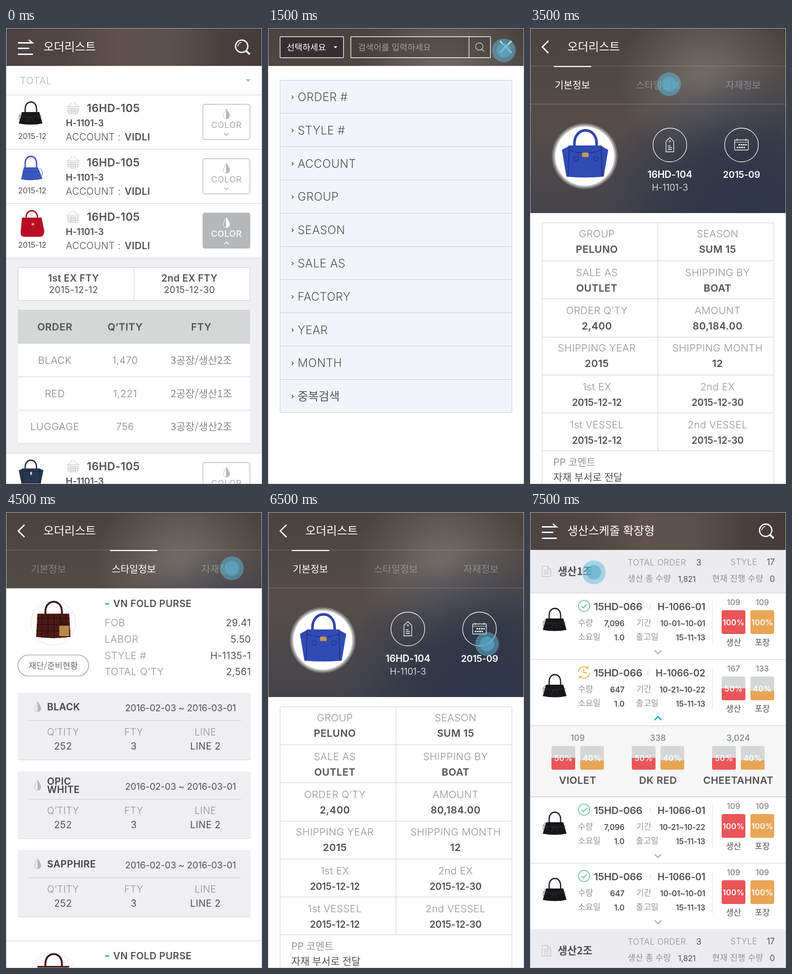
An HTML page that plays this animation: 561x998 px, repeating every 8 s.

```html
<!DOCTYPE html>
<html lang="ko">
<head>
<meta charset="utf-8">
<title>Order list</title>
<style>
html, body { margin: 0; width: 100%; height: 100%; overflow: hidden; background: #fff; }
svg { display: block; width: 100%; height: 100%; }
text { font-family: Inter, "Noto Sans CJK KR", "Noto Sans KR", sans-serif; font-optical-sizing: none; letter-spacing: .02em; white-space: pre; }
.k { font-family: "Noto Sans CJK KR", "Noto Sans KR", "Noto Sans CJK", sans-serif; letter-spacing: 0; }
.n { letter-spacing: -.01em; }
.l { font-weight: 300; }
.d { font-weight: 350; }
.m { font-weight: 500; }
.b { font-weight: 600; }
.c { text-anchor: middle; }
.e { text-anchor: end; }

.page { opacity: 0; animation: 8s step-end infinite; }
#list { animation-name: list; }
#search { animation-name: search; }
#basic { animation-name: basic; }
#style { animation-name: style; }
#parts { animation-name: parts; }
#plan { animation-name: plan; }
@keyframes list { 0%, 25% { opacity: 1 } 12.5%, 37.5%, 100% { opacity: 0 } }
@keyframes search { 0%, 25%, 100% { opacity: 0 } 12.5% { opacity: 1 } }
@keyframes basic { 0%, 50%, 87.5%, 100% { opacity: 0 } 37.5%, 75% { opacity: 1 } }
@keyframes style { 0%, 62.5%, 100% { opacity: 0 } 50% { opacity: 1 } }
@keyframes parts { 0%, 75%, 100% { opacity: 0 } 62.5% { opacity: 1 } }
@keyframes plan { 0%, 100% { opacity: 0 } 87.5% { opacity: 1 } }

#touch { animation: hop 8s step-end infinite; }
#touch g { animation: tap 1s step-end infinite; }
@keyframes tap { 0%, 100% { opacity: 0 } 50% { opacity: 1 } }
@keyframes hop {
  0% { transform: translate(517px, 49px) }
  25% { transform: translate(228px, 194px) }
  37.5% { transform: translate(305px, 123px) }
  50% { transform: translate(495px, 123px) }
  62.5% { transform: translate(86px, 137px) }
  75% { transform: translate(480px, 289px) }
  87.5%, 100% { transform: translate(140px, 132px) }
}
</style>
</head>
<body>
<svg id="stage" viewBox="0 0 561 998">
  <defs>
    <linearGradient id="bar">
      <stop offset="0" stop-color="#4b4443"/><stop offset=".22" stop-color="#504543"/>
      <stop offset=".45" stop-color="#60524c"/><stop offset=".65" stop-color="#5a514d"/>
      <stop offset=".85" stop-color="#47403e"/><stop offset="1" stop-color="#433c3a"/>
    </linearGradient>
    <linearGradient id="base" gradientUnits="userSpaceOnUse" x1="0" y1="0" x2="0" y2="405">
      <stop offset="0" stop-color="#494340"/><stop offset=".5" stop-color="#544d4a"/>
      <stop offset="1" stop-color="#45444a"/>
    </linearGradient>
    <radialGradient id="glow" gradientUnits="userSpaceOnUse" cx="385" cy="115" r="190">
      <stop offset="0" stop-color="#746e6a"/><stop offset="1" stop-color="#746e6a" stop-opacity="0"/>
    </radialGradient>
    <radialGradient id="navy" gradientUnits="userSpaceOnUse" cx="480" cy="410" r="330">
      <stop offset="0" stop-color="#2d3549"/><stop offset=".45" stop-color="#303748" stop-opacity=".9"/>
      <stop offset="1" stop-color="#303748" stop-opacity="0"/>
    </radialGradient>
  </defs>
</svg>
<script>
const INK = '#515153', GREY = '#939395', PALE = '#b6b7b9', RULE = '#cbcbcd', TEAL = '#1db3c0';
const RED = '#ea5559', AMBER = '#e8a556';

const t = (x, y, size, cls, fill, s) =>
  `<text x="${x}" y="${y}" font-size="${size}" class="${cls}" fill="${fill}">${s}</text>`;
const rect = (x, y, w, h, fill, more = '') =>
  `<rect x="${x}" y="${y}" width="${w}" height="${h}" fill="${fill}" ${more}/>`;
const path = (d, stroke, w = 1, fill = 'none') =>
  `<path d="${d}" stroke="${stroke}" stroke-width="${w}" fill="${fill}"/>`;
const ring = (x, y, r, stroke, w, fill = 'none') =>
  `<circle cx="${x}" cy="${y}" r="${r}" stroke="${stroke}" stroke-width="${w}" fill="${fill}"/>`;
const hline = (y, x1 = 0, x2 = 561, c = RULE) => path(`M${x1} ${y + .5}H${x2}`, c);
const at = (x, y, s, k = 1) => `<g transform="translate(${x} ${y}) scale(${k})">${s}</g>`;
const box = (c, r = 0) => `stroke="${c}" rx="${r}"`;
const rows = (list, f) => list.map(f).join('');
const chevron = (x, y, w, up, c, sw) =>
  path(`M${x - w} ${y + (up ? w : -w) / 2}L${x} ${y - (up ? w : -w) / 2}L${x + w} ${y + (up ? w : -w) / 2}`, c, sw);

// Bags are drawn in a 52 by 52 box
const BAGS = {
  black: ['#17171a', '#3a3a3e', 'M7 23H45L52 48Q26 53 0 48Z', 'M2 31Q26 36 50 31M24 33L18 44M27 33L32 43M6 24Q-2 32 2 40'],
  blue: ['#3a57c0', '#2a409a', 'M11 25H42L52 50Q28 56 5 51Z', 'M8 33Q27 37 46 33M45 27Q56 33 50 44'],
  red: ['#b90d27', '#7f0a1c', 'M7 16H50L56 46Q55 58 47 58H12Q4 58 4 48Z', 'M8 19H49M16 16V24M40 16V24'],
  navy: ['#29364f', '#131b2b', 'M0 23L9 19H45L54 23L48 53H6Z', 'M9 19L8 53M45 19L46 53M9 25H45'],
  wing: ['#314bb4', '#1f3182', 'M0 23L9 18H43L52 23L47 53Q26 55 5 53Z', 'M8 18L7 53M44 18L45 53M8 23Q26 30 44 23'],
  maroon: ['#4b1a18', '#2a0d0c', 'M2 19H50L52 54Q26 58 0 54Z', 'M1 26H51M1 35H51M0 45H52M9 20V55M18 20V55M27 20V56M36 20V56M45 20V55']
};
const TRIM = {
  red: rect(28, 28, 6, 5, '#e2b04a', 'rx="2"'),
  navy: rect(25, 26, 4, 7, '#c9c9cd', 'rx="1"'),
  wing: rect(22.5, 26, 7.5, 5, '#c29a55', 'rx="1"') + ring(16, 33, 2.5, '#1f3182', .8) + ring(38, 33, 2.5, '#1f3182', .8),
  maroon: path('M34 20L42 38', '#2a0d0c', 1) + rect(35, 37, 15, 16, '#b98a4c', 'rx="1"')
};
function bag(kind, x, y, k = 1) {
  const [main, dark, body, seams] = BAGS[kind];
  const wide = kind === 'red' ? 2 : 0;
  const grip = `M${14 + wide} 28V16C${14 + wide} -4 ${39 + wide} -4 ${39 + wide} 16V28`;
  return at(x, y, path(grip, dark, 2.8) + path(body, 'none', 0, main) + path(seams, dark, .9) +
    path(grip, main, 1.6) + (TRIM[kind] || ''), k);
}

const drop = (x, y, c) => at(x, y,
  path('M0 -11Q-7 0 -7 4.5A7 6.8 0 0 0 0 11Z', c, 1) + path('M0 -11Q7 0 7 4.5A7 6.8 0 0 1 0 11Z', c, 1, c));
const basket = (x, y) => at(x, y, path('M.5 10.5H30M3 14H28L25 26H6ZM5 10L14 .5M26 10L17 .5M4 18H27M5 22H26M11 14V26M15.500 14V26M20 14V26', PALE));
const title = s => t(82, 50, 25, 'k d', '#fff', s);
const lens = path('M526.500 50.500L534 57.500', '#fff', 4) + ring(516.5, 40, 13.5, '#fff', 2.8) +
  path('M508 40A8.500 8.500 0 0 1 516 31.500', '#fff', 1.5);
const topBar = s => rect(0, 1, 561, 82, 'url(#bar)') +
  path('M26 32.500H58L50 26M26 44.500H51M26 57.500H59', '#fff', 2.8) + title(s) + lens;
const hero = h => rows(['base', 'glow', 'navy'], g => rect(0, 1, 561, h - 1, `url(#${g})`));

function item(top, kind, open) {
  const c = open ? '#fff' : PALE;
  return bag(kind, 28, top + 15) +
    t(57.5, top + 97, 17, 'c n', INK, '2015-12') + basket(131.5, top + 15.5) +
    t(177, top + 38, 24, 'b', INK, '16HD-105') + t(131, top + 69, 20, 'b n', INK, 'H-1101-3') +
    t(131, top + 100, 21, 'l', INK, 'ACCOUNT :') + t(260, top + 100, 21, 'b', INK, 'VIDLI') +
    rect(431.5, top + 21, 103, 77, open ? PALE : '#fff', box(PALE, 4) + ' stroke-width="1.4"') +
    drop(483, top + 42, c) + t(483, top + 73, 19, 'c m', c, 'COLOR') +
    chevron(483, top + 86.5, 4.5, open, c, 1.8) + hline(top + 119);
}

function listPage() {
  const orders = [['BLACK', '1,470', '3공장/생산2조'], ['RED', '1,221', '2공장/생산1조'], ['LUGGAGE', '756', '3공장/생산2조']];
  const mid = [107, 261, 428];
  return topBar('오더리스트') + t(30, 123, 22, 'l', PALE, 'TOTAL') +
    path('M525 112H536L530.500 118Z', 'none', 0, PALE) + hline(146) +
    rect(0, 503, 561, 427, '#efeff1') +
    item(146, 'black') + item(265, 'blue') + item(384, 'red', true) + hline(930) + item(930, 'navy') +
    rect(26.5, 524.5, 508, 72, '#fff', box(RULE)) + path('M280.500 525V597', RULE) +
    rows([[148, '1st', '12'], [402, '2nd', '30']], ([x, n, d]) =>
      t(x, 555, 21, 'c b', INK, n + ' EX FTY') + t(x, 580, 20, 'c', INK, '2015-12-' + d)) +
    rect(26, 618, 509, 73, '#d5d7d6') + rect(26, 691, 509, 218, '#fff') + hline(617, 26, 535) +
    rows(['ORDER', 'Q’TITY', 'FTY'], (s, i) => t(mid[i], 662, 22, 'c b', INK, s)) +
    rows(orders, (o, r) => hline(690 + 73 * (r + 1), 26, 535) +
      rows(o, (s, i) => t(mid[i], 735 + 72.7 * r, 22, i > 1 ? 'c k d' : 'c l', '#868688', s)));
}

function searchPage() {
  const keys = ['ORDER #', 'STYLE #', 'ACCOUNT', 'GROUP', 'SEASON', 'SALE AS', 'FACTORY', 'YEAR', 'MONTH', '중복검색'];
  return hero(83) +
    rect(26.5, 19, 139, 46, '#343031', box('#fff', 1) + ' stroke-width="1.4"') +
    t(41, 48.5, 18.7, 'k l', '#fff', '선택하세요') + path('M144 40H152L148 44.500Z', 'none', 0, '#fff') +
    rect(181.5, 19, 306, 46, '#3a3433', box('#fff', 1) + ' fill-opacity=".35" stroke-width="1.4"') +
    path('M440.500 19V65', '#fff', 1.3) + t(197, 48.5, 18.7, 'k l', '#a49e9b', '검색어를 입력하세요') +
    ring(463, 40.5, 8, '#e4e2e1', 1.3) + path('M468.500 46.500L474 51.500', '#e4e2e1', 1.4) +
    path('M508.500 28.500L533.500 54M533.500 28.500L508.500 54', '#fff', 3.4) +
    rect(26.5, 114.5, 508, 727, '#f1f5fa', box('#c6cad0', 2)) +
    rows(keys, (s, i) => {
      const y = 151 + 72.8 * i;
      return (i ? hline(Math.round(y - 37.5), 27, 534, '#c6cad0') : '') +
        path(`M52 ${y - 3}L55.500 ${y + .5}L52 ${y + 4}`, INK, 1.7) +
        t(65, y + 9, 25, s < 'Z' ? 'l' : 'k', INK, s);
    });
}

function tabs(h, on) {
  const names = ['기본정보', '스타일정보', '자재정보'], mid = [93, 280, 467], half = [41, 52, 41];
  return hero(h) + path('M40.500 28L27 41.500L40.500 55', '#fff', 3) + title('오더리스트') +
    hline(83, 0, 561, '#ffffff40') + (h > 167 ? hline(166, 0, 561, '#ffffff40') : '') +
    rect(mid[on] - half[on], 83, 2 * half[on], 2.4, '#fff') +
    rows(names, (s, i) => t(mid[i], 132, 21, i === on ? 'c k m' : 'c k d', i === on ? '#fff' : '#ffffff50', s));
}

function basicPage() {
  const pairs = [['GROUP', 'PELUNO', 'SEASON', 'SUM 15'], ['SALE AS', 'OUTLET', 'SHIPPING BY', 'BOAT'],
    ['ORDER Q’TY', '2,400', 'AMOUNT', '80,184.00'], ['SHIPPING YEAR', '2015', 'SHIPPING MONTH', '12'],
    ['1st EX', '2015-12-12', '2nd EX', '2015-12-30'], ['1st VESSEL', '2015-12-12', '2nd VESSEL', '2015-12-30']];
  const base = [458, 543, 626, 708, 793, 876];
  const tag = path('M298 271V248L306.500 240L315 248V271ZM302 258H308M302 262H311M302 266H311', '#fff', 1.3) + ring(306.5, 248, 1.8, '#fff', 1);
  const cal = rect(448.5, 245, 30, 22, 'none', box('#fff', 1) + ' stroke-width="1.3"') +
    path('M449 250H478M454 242V247M473 242V247', '#fff', 1.2) +
    path('M457 255.500H475M453 261.500H471', '#fff', 3).replace('/>', ' stroke-dasharray="3.500 1.500"/>');
  const cell = (x, y, a, b) => t(x, y, 22, 'c l', GREY, a) +
    (/^\d{4}-/.test(b) ? t(x, y + 33.5, 20.8, 'c b n', INK, b) : t(x, y + 33.5, 22, 'c b', INK, b));
  return tabs(405, 0) +
    ring(120, 280.5, 72, 'none', 0, '#ffffff40') + ring(120, 280.5, 68.5, 'none', 0, '#ffffff70') +
    ring(120, 280.5, 65, 'none', 0, '#fff') + bag('wing', 70, 222, 1.95) +
    ring(306.5, 256, 37, '#fff', 1.3) + ring(463.5, 256, 37, '#fff', 1.3) + tag + cal +
    t(306.5, 328, 21, 'c b n', '#fff', '16HD-104') + t(306.5, 355.5, 20, 'c l n', '#fff', 'H-1101-3') +
    t(463.5, 328, 20.3, 'c b n', '#fff', '2015-09') +
    rect(26.5, 426.5, 508, 600, '#fff', box(RULE)) + path('M280.500 427V925', RULE) +
    rows(pairs, ([a, b, c, d], i) => cell(146.5, base[i], a, b) + cell(411, base[i], c, d) +
      hline(Math.round(426 + 83.2 * (i + 1)), 27, 534)) +
    t(51, 958, 21.5, 'k d', GREY, 'PP 코멘트') + t(51, 991, 21.7, 'k m', INK, '자재 부서로 전달');
}

function card(y, name) {
  const lines = name.split('|');
  return rect(26, y + 1, 510, 146, '#cdcdd1', 'rx="4"') + rect(26, y, 510, 146, '#efeff1', 'rx="4"') +
    drop(69.5, y + 30, PALE) +
    rows(lines, (s, i) => t(90, y + (lines[1] ? 29 + 18 * i : 38), 21, 'b', '#434345', s)) +
    t(504, y + 39.5, 20, 'e n', INK, '2016-02-03 ~ 2016-03-01') + hline(y + 60, 48, 515) +
    rows([[125, 'Q’TITY', '252'], [280, 'FTY', '3'], [437, 'LINE', 'LINE 2']], ([x, a, b]) =>
      t(x, y + 93, 21, 'c l', GREY, a) + t(x, y + 124, 21, 'c', INK, b));
}
const COLORS = ['BLACK', 'OPIC|WHITE', 'SAPPHIRE'];

function stylePage() {
  const facts = [['FOB', '29.41'], ['LABOR', '5.50'], ['STYLE #', 'H-1135-1'], ['TOTAL Q’TY', '2,561']];
  const product = y => ring(103.5, y + 243, 49, '#dcdcde', 1) + bag('maroon', 66, y + 195, 1.45) +
    rect(217, y + 199.5, 9, 3, TEAL) + t(235, y + 208, 21, 'b', INK, 'VN FOLD PURSE');
  return tabs(167, 1) + product(0) +
    rect(26, 313, 155, 46, '#fff', box('#858587', 23) + ' stroke-width="1.2"') +
    t(103.5, 342.5, 18.3, 'c k', '#69696b', '재단/준비현황') +
    rows(facts, ([a, b], i) => t(216, 250 + 35.8 * i, 22, 'l', GREY, a) + t(537, 250 + 35.8 * i, 21, 'e', INK, b)) +
    rows(COLORS, (s, i) => card(396 + 172 * i, s)) + hline(938) + product(771);
}

const partsPage = () => tabs(167, 2) + rows([0, 1, 2, 3, 4], i => card(193 + 172 * i, COLORS[i % 3]));

function gauge(x, y, pct, color) {
  const h = 52 * pct / 100;
  const fill = pct < 100 ? path(`M${x} ${y + 52 - h}h52v${h - 4}q0 4 -4 4h-44q-4 0 -4 -4z`, 'none', 0, color) : '';
  return rect(x, y, 52, 52, pct < 100 ? '#d5d7d6' : color, 'rx="4"') + fill +
    t(x + 26, y + 32.5, 17, 'c b', '#fff', pct + '%');
}

function group(y, n) {
  const fact = (x, base, s, k) => t(x, y + base, 18.4, k ? 'k d' : 'l', GREY, s);
  return rect(0, y, 561, 94, '#ebebf0') + hline(y + 94) +
    at(26, y + 35, path('M.5 .5H13L19.500 7V23.500H.500ZM13 .5V7H19.500M4 10H15M4 14H15M4 18H15', PALE)) +
    t(61, y + 55, 22.5, 'k b', INK, `생산${n}조`) +
    fact(214, 34, 'TOTAL ORDER') + t(376, y + 34, 18.5, 'e', INK, '3') +
    fact(439, 33, 'STYLE') + t(536, y + 33, 18, 'e n', INK, '17') +
    fact(214, 69, '생산 총 수량', 1) + t(363, y + 69.5, 17, 'e n', INK, '1,821') +
    fact(399, 69, '현재 진행 수량', 1) + t(537, y + 69.5, 18, 'e', INK, '0');
}

function job(y, no, qty, span, busy) {
  const mark = busy
    ? path('M106 29A12.500 12.500 0 0 1 127 20M130.500 30A12.500 12.500 0 0 1 109 38M127 15V20.500H121.500M109 43V37.500H114.500M118 22V30H125', '#f0a033', 1.7)
    : ring(118.5, 28.5, 12.3, '#4cb68d', 1.5) + path('M112.500 28.500L117 33L125 24.500', '#4cb68d', 1.6);
  const label = (x, base, s) => t(x, base, 18, 'k d', GREY, s);
  const value = (x, base, s) => t(x, base, 17, 'e b n', INK, s);
  return at(0, y, bag('black', 28, 33) + mark +
    t(140, 38, 22, 'b n', INK, '15HD-066') + path(`M${busy ? 258.5 : 263.5} 24V36`, RULE) +
    t(384, 37.5, 20.8, 'e b n', INK, no) +
    label(105, 72, '수량') + value(207, 72.5, qty) + label(233, 72, '기간') + value(384, 72.5, span) +
    label(105, 103, '소요일') + value(207, 103.5, '1.0') + label(232, 103, '출고일') + value(384, 103.5, '15-11-13') +
    path('M399.500 18V111', '#dedee0') +
    rows([[420, busy ? '167' : '109', busy ? 50 : 100, RED, '생산'], [483, busy ? '133' : '109', busy ? 40 : 100, AMBER, '포장']],
      ([x, n, pct, c, s]) => t(x + 26, 27, 17.5, 'c m n', '#868688', n) + gauge(x, 38, pct, c) +
        t(x + 26, 114.5, 18, 'c k', INK, s)) +
    chevron(280.5, 129.5, 7.5, busy, busy ? TEAL : PALE, 3) + hline(145));
}

function planPage() {
  return topBar('생산스케줄 확장형') + rect(0, 467, 561, 156, '#f6f6f7') + group(83, 1) +
    job(177, 'H-1066-01', '7,096', '10-01~10-01') + job(322, 'H-1066-02', '647', '10-21~10-22', true) +
    rows([['109', 'VIOLET'], ['338', 'DK RED'], ['3,024', 'CHEETAHNAT']], ([n, s], i) => {
      const x = 47 + 176 * i;
      return t(x + 57.5, 501, 18, 'c m', '#868688', n) + gauge(x, 512, 50, RED) + gauge(x + 63, 512, 40, AMBER) +
        t(x + 57.5, 595, 22, 'c b', INK, s);
    }) + hline(623, 0, 561, '#adadaf') +
    job(623, 'H-1066-01', '7,096', '10-21~10-22') + job(768, 'H-1066-01', '647', '10-01~10-01') + group(913, 2);
}

const pages = { list: listPage, search: searchPage, basic: basicPage, style: stylePage, parts: partsPage, plan: planPage };
const touch = ring(0, 0, 26, 'none', 0, 'rgba(100,185,215,.5)') + ring(0, 0, 16, 'none', 0, 'rgba(90,172,203,.65)');
document.getElementById('stage').insertAdjacentHTML('beforeend',
  rows(Object.entries(pages), ([id, draw]) =>
    `<g id="${id}" class="page">${rect(0, 0, 561, 998, '#fff')}${draw()}</g>`) +
  rect(.5, .5, 560, 997, 'none', box('#c4c4c6')) + `<g id="touch"><g>${touch}</g></g>`);
</script>
</body>
</html>
```
